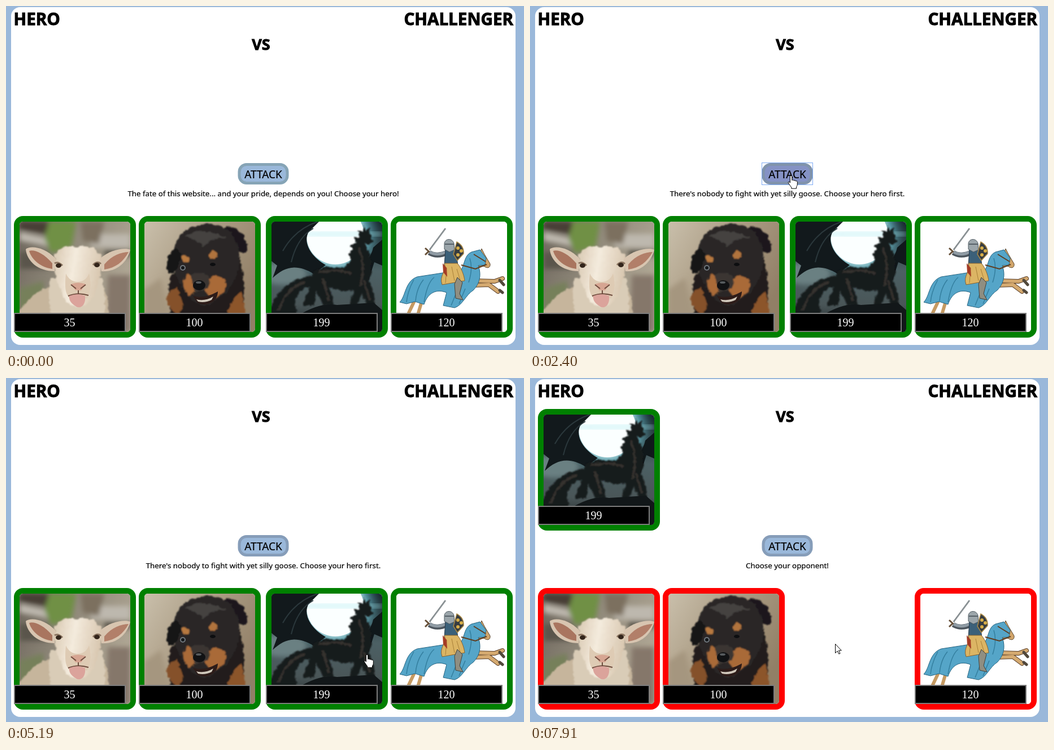
An HTML page for the animation above (7.99 s loop, 917 px wide and 611 px high).

```html
<!DOCTYPE html>
<html lang="en">
<head>
<meta charset="utf-8">
<title>Hero vs Challenger</title>
<style>
  html, body { margin: 0; width: 100%; height: 100%; overflow: hidden; background: #9ab8da; }
  svg.stage { display: block; width: 100vw; height: 100vh; }
  text { font-family: "Noto Sans", "Open Sans", sans-serif; fill: #000; stroke: #000; stroke-width: .2px; }
  .head { font-size: 29.6px; font-weight: 700; stroke-width: 1px; }
  .mid { text-anchor: middle; }
  .hp { font: 20px "Liberation Serif", "Noto Serif", serif; fill: #fff; stroke: none; }
  .frame { fill: #fff; stroke: green; stroke-width: 10; }
  .enemy .frame { stroke: red; }
  .btn { fill: #9ab8da; stroke: #86a4b6; stroke-width: 5; }
  .used .btn { stroke: #869db9; }
  .hover .btn { fill: #8592c5; stroke: #8093ac; }
  .ring { fill: none; stroke: #7eabf5; visibility: hidden; }
  .focus .ring { visibility: visible; }
  .arrow, .hand { fill: #fff; stroke: #000; stroke-linejoin: round; }
  .beam { fill: none; stroke: #000; }
</style>
</head>
<body>
<svg class="stage" viewBox="0 0 917 611">
  <defs>
    <clipPath id="inner"><rect width="196" height="196" rx="6"/></clipPath>
    <filter id="soft" x="-30%" y="-30%" width="160%" height="160%"><feGaussianBlur stdDeviation="4"/></filter>
    <filter id="fur" x="-10%" y="-10%" width="120%" height="120%">
      <feTurbulence type="fractalNoise" baseFrequency=".14" numOctaves="2" seed="4" result="n"/>
      <feDisplacementMap in="SourceGraphic" in2="n" scale="7" xChannelSelector="R" yChannelSelector="G"/>
      <feGaussianBlur stdDeviation=".8"/>
    </filter>
    <linearGradient id="yard" x2="1" y2=".4">
      <stop offset="0" stop-color="#6d665c"/><stop offset=".5" stop-color="#918a7b"/><stop offset="1" stop-color="#aea593"/>
    </linearGradient>
    <linearGradient id="floor" x2="1" y2=".6">
      <stop offset="0" stop-color="#c9bfab"/><stop offset=".5" stop-color="#ab9c84"/><stop offset="1" stop-color="#917f66"/>
    </linearGradient>
    <linearGradient id="wool" x2="1" y2=".2">
      <stop offset="0" stop-color="#d8c8b1"/><stop offset=".45" stop-color="#f4ebdd"/><stop offset="1" stop-color="#d9c8b1"/>
    </linearGradient>
    <linearGradient id="night" x2="0" y2="1">
      <stop offset="0" stop-color="#15242a"/><stop offset=".45" stop-color="#4c6064"/><stop offset=".75" stop-color="#4a5658"/><stop offset="1" stop-color="#202628"/>
    </linearGradient>
    <radialGradient id="glow">
      <stop offset=".5" stop-color="#e4ffff"/><stop offset=".68" stop-color="#6bbccb" stop-opacity=".7"/><stop offset="1" stop-color="#305860" stop-opacity="0"/>
    </radialGradient>

    <g id="sheep">
      <rect width="196" height="196" fill="url(#yard)"/>
      <g filter="url(#soft)">
        <path d="M0 0H60L48 22 0 14z" fill="#463d34"/>
        <path d="M0 18 52 30V44L0 34zM120 22H196V46H128z" fill="#bdb8ae"/>
        <path d="M0 54H50V84H0zM150 50H196V62H150z" fill="#5a554b"/>
        <path d="M52 0H100L92 44 56 56 44 30z" fill="#6f9044"/>
        <path d="M108 0H150L140 40 112 34z" fill="#7c705e"/>
        <path d="M0 118 42 106V150L0 160z" fill="#76805a"/>
        <path d="M156 95H196V196H152z" fill="#85776a"/>
      </g>
      <g filter="url(#fur)">
        <path d="M-4 162C14 140 32 120 56 114L145 112C160 130 158 160 156 200H-4z" fill="#c6b59c"/>
        <path d="M54 100C48 135 55 170 70 200H146C153 165 153 130 145 100z" fill="#d9ccb7"/>
        <path d="M62 64C65 45 85 42 102 45 122 40 143 50 146 66 147 90 138 116 130 134 122 156 84 156 78 134 70 116 58 92 62 64z" fill="url(#wool)"/>
      </g>
      <path d="M64 66C44 44 18 42 11 49 13 70 32 88 62 88z" fill="#d8c5b0"/>
      <path d="M58 74C42 55 25 49 17 52 22 69 38 81 58 84z" fill="#a9755f"/>
      <path d="M142 66C162 48 188 46 196 50 190 74 170 90 145 88z" fill="#d8c5b0"/>
      <path d="M150 76C163 60 180 54 193 54 183 72 170 82 150 85z" fill="#b27f69"/>
      <path d="M82 92C80 115 80 127 89 137L104 127 119 137C128 122 126 105 123 92 116 112 90 112 82 92z" fill="#decbb4"/>
      <path d="M62 74Q68 70 76 78M130 77Q138 69 144 75" fill="none" stroke="#8a7460" stroke-width="3"/>
      <ellipse cx="69" cy="78" rx="5" ry="4" fill="#33251b"/><ellipse cx="137" cy="77" rx="5" ry="4" fill="#33251b"/>
      <path d="M91 111Q104 106 117 111L109 122H99z" fill="#d6a592"/>
      <path d="M91 112 100 119M117 112 108 119M104 122V129M86 132Q104 125 122 131" fill="none" stroke="#6e4c3e" stroke-width="2"/>
      <path d="M88 132Q103 126 116 132C118 150 106 156 99 150 91 145 87 139 88 132z" fill="#dba39b"/>
    </g>

    <g id="puppy">
      <rect width="196" height="196" fill="url(#floor)"/>
      <path d="M0 120 30 100 50 196H0z" fill="#a5967f" filter="url(#soft)"/>
      <g filter="url(#fur)">
        <path d="M48 95C38 120 40 165 62 200H168C178 160 180 110 168 60L120 40z" fill="#221e1c"/>
        <path d="M46 122C34 140 42 156 60 166L70 148 58 118z" fill="#85512b"/>
        <path d="M146 160Q162 128 172 124L180 164 160 178z" fill="#8c552c"/>
        <path d="M140 12C162 0 184 28 182 54 168 60 154 46 140 12z" fill="#1a191a"/>
        <path d="M52 52C56 14 92 3 120 5 153 8 170 36 168 70 166 106 140 140 106 150 76 146 44 88 52 52z" fill="#2a2828"/>
        <path d="M72 26Q105 6 146 30 125 24 104 44 86 28 72 26z" fill="#454240"/>
        <path d="M57 46C36 58 36 84 44 92 58 94 62 72 66 59z" fill="#151414"/>
        <path d="M77 92C66 105 66 122 80 131L94 122 90 103zM118 98C130 92 148 100 144 118 138 130 128 136 116 136L106 121z" fill="#a96a38"/>
        <path d="M82 96Q97 83 115 98L114 118 90 126z" fill="#3a3633"/>
        <ellipse cx="73" cy="66" rx="8" ry="6" transform="rotate(28 73 66)" fill="#b77940"/>
        <ellipse cx="122" cy="59" rx="7" ry="8" transform="rotate(25 122 59)" fill="#b0733d"/>
      </g>
      <circle cx="68" cy="82" r="5" fill="#6f777d"/><circle cx="68" cy="82" r="3" fill="#15181b"/>
      <ellipse cx="121" cy="76" rx="5" ry="3" fill="#0d0e10"/>
      <ellipse cx="97" cy="113" rx="11" ry="9" fill="#111214"/><ellipse cx="96" cy="108" rx="5" ry="2" fill="#575b5e"/>
      <path d="M86 132Q106 138 130 124C130 144 108 152 94 144z" fill="#2d1c19"/>
      <path d="M92 138Q107 142 122 133L119 139Q107 145 95 142z" fill="#cfc7ba"/>
    </g>

    <g id="dragon">
      <rect width="196" height="196" fill="url(#night)"/>
      <ellipse cx="20" cy="92" rx="42" ry="20" fill="#6b8082" filter="url(#soft)"/>
      <circle cx="113" cy="25" r="86" fill="url(#glow)"/>
      <circle cx="113" cy="25" r="51" fill="#fbffff"/>
      <path d="M0 22 80 19H196V25H65z" fill="#a2e7ee" opacity=".55" filter="url(#soft)"/>
      <path d="M0 0H84L66 18C56 34 66 60 96 77L75 93C45 74 23 80 2 100L10 78 0 70z" fill="#12191c"/>
      <path d="M82 0Q42 13 20 52M74 12Q45 29 35 72" fill="none" stroke="#2b383c" stroke-width="2"/>
      <path d="M156 96C160 72 176 67 180 46L196 32V78L182 72 172 104z" fill="#10181b"/>
      <g filter="url(#fur)">
        <path d="M-4 160C8 122 35 100 72 97 72 86 86 80 106 81L130 82C140 74 140 64 136 58L144 50 140 42 150 38 146 28 156 27 152 16 162 17 163 6 168 15 174 10 172 22 182 36 170 42 164 38C178 62 180 86 172 106L179 121 183 147 169 150 160 126 152 149 139 150 145 121C124 127 112 119 102 116L112 149H92L80 123 75 149H55L68 116C46 120 34 140 48 168H-4z" fill="#191b1c"/>
        <path d="M84 89Q124 84 142 92M60 107Q28 116 12 158M154 46Q168 76 157 115M91 102 102 140M164 104 174 140" fill="none" stroke="#36322f" stroke-width="4"/>
      </g>
      <path d="M45 168Q86 142 116 148L181 144 196 157V196H0V166z" fill="#121719"/>
    </g>

    <g id="knight">
      <rect width="196" height="196" fill="#fff"/>
      <g fill="none" stroke-linecap="round" stroke-linejoin="round">
        <path d="M136 113 164 112 180 124M137 105 174 106 188 101" stroke="#553923" stroke-width="8"/>
        <path d="M136 113 164 112 180 124M137 105 174 106 188 101" stroke="#d5aa70" stroke-width="6"/>
        <path d="M183 122 188 126M183 104 190 112" stroke="#51483b" stroke-width="5"/>
        <path d="M31 143 22 162M44 145 39 162" stroke="#c59a62" stroke-width="6"/>
      </g>
      <path d="M147 60 151 48 156 58 166 75C167 82 161 84 155 79L142 80z" fill="#d2a66b" stroke="#59452e"/>
      <path d="M114 87C122 74 120 60 133 54L148 50 159 65 157 77 145 78C151 94 148 110 136 122 123 130 117 149 103 153L83 149 89 126C71 119 56 126 49 147L33 142 18 146 6 143C17 132 15 106 37 98L82 91z" fill="#55a5c8" stroke="#276480"/>
      <path d="M31 103Q20 123 18 143M48 103Q36 118 34 141M67 99Q55 108 49 143M105 129 97 149M122 119 111 146M130 65Q136 83 128 108" fill="none" stroke="#337e9e" stroke-width="1.5"/>
      <path d="M115 77 140 84 160 76M137 58 158 71" fill="none" stroke="#5f3e21" stroke-width="2"/>
      <path d="M59 50 87 12" stroke="#5a6266" stroke-width="2.4"/><path d="M60 49 87 12" stroke="#d1d8da" stroke-width=".8"/>
      <path d="M51 47 63 58M57 53 51 59" stroke="#67513a" stroke-width="3"/>
      <path d="M58 55Q73 64 91 54" fill="none" stroke="#4d565e" stroke-width="9"/>
      <path d="M59 54Q73 62 89 53" fill="none" stroke="#8f9ba4" stroke-width="5"/>
      <path d="M87 49H105L109 78H85z" fill="#3b6079" stroke="#25394a"/>
      <path d="M85 74H108C115 82 120 95 121 105L81 112C75 95 90 88 85 74z" fill="#dcb564" stroke="#866230"/>
      <path d="M89 82 87 109M98 80 103 105M107 84 113 104" stroke="#a98039"/>
      <path d="M82 74 89 82 90 98 83 90z" fill="#a43c25"/>
      <path d="M108 99 117 108 112 128 118 139 105 136 103 111z" fill="#8f8e81" stroke="#42413b"/>
      <path d="M85 49V39C86 29 100 29 102 39L103 50 94 54z" fill="#9ba5aa" stroke="#4f5a61"/>
      <path d="M86 40H102" stroke="#576168" stroke-width="2"/>
      <path d="M107 36Q120 43 119 57L108 69 101 58z" fill="#363c41" stroke="#aa8844" stroke-width="1.5"/>
      <g fill="#d7ae48"><circle cx="109" cy="47" r="3"/><circle cx="115" cy="52" r="3"/><circle cx="109" cy="59" r="3"/></g>
    </g>
  </defs>

  <rect width="917" height="611" fill="#9ab8da"/>
  <rect x="9" y="2" width="893" height="600" rx="16" fill="#fff"/>
  <text class="head" x="13.5" y="34">HERO</text>
  <text class="head" x="898" y="34" text-anchor="end">CHALLENGER</text>
  <text class="head mid" x="451.5" y="78" style="font-size:27px">VS</text>

  <g id="attack">
    <rect class="btn" x="413" y="281.5" width="85" height="33" rx="13"/>
    <rect class="ring" x="410.5" y="278.5" width="90" height="39"/>
    <text class="mid" x="455.5" y="306" font-size="19">ATTACK</text>
  </g>
  <text id="msg" class="mid" x="455.5" y="338" font-size="13.3"></text>
  <g id="cards"></g>
  <g id="cursor">
    <path class="arrow" d="M.5.5V16.5L4.2 13 6.8 18.2 9 17.2 6.5 12H11.3z"/>
    <path class="hand" d="M-1.6 13V2a1.7 1.7 0 0 1 3.4 0V8.5c1-1 3-.8 3.3.7 1-.9 2.9-.6 3.2.8 1.2-.7 3 .1 3 1.7V16c0 2-1.4 3.2-1.8 5v2.2H.8V21.2C-1.5 18-3.2 15.7-4.6 13.2c-.8-1.8 1-2.8 2-1.6z"/>
    <path class="beam" d="M.5-7V7M-2 7.5H0M1 7.5H3M-2-7.5H0M1-7.5H3"/>
  </g>
</svg>
<script>
const LOOP = 7990, PRESS = 2250, REPLY = 2400, BLUR = 5190, PICK = 5420;
const $ = id => document.getElementById(id);

const cards = [
  { id: "sheep", hp: 35, x: 14 },
  { id: "puppy", hp: 100, x: 235 },
  { id: "dragon", hp: 199, x: 460 },
  { id: "knight", hp: 120, x: 681 }
];
$("cards").innerHTML = cards.map(c => `<g>
  <rect class="frame" x="5" y="5" width="206" height="206" rx="11"/>
  <g transform="translate(10 10)" clip-path="url(#inner)"><use href="#${c.id}"/></g>
  <rect x="1" y="173" width="196" height="32" stroke="#7d7d7d" stroke-width="2"/>
  <text class="hp mid" x="98.5" y="196">${c.hp}</text></g>`).join("");
cards.forEach((c, i) => c.el = $("cards").children[i]);

// Pointer moves: first step, last step, step count, end point
const moves = [
  [610, 1390, 11, 494, 348],
  [1470, 1620, 3, 474, 324],
  [1697, 1930, 4, 462, 301],
  [3260, 3870, 9, 537, 431],
  [3950, 4030, 2, 558, 449],
  [4100, 4730, 9, 639, 490],
  [4880, 4880, 1, 639, 491],
  [5420, 5420, 1, 640, 491],
  [6890, 7510, 9, 500, 454],
  [7590, 7590, 1, 493, 457],
  [7750, 7910, 3, 540, 472]
];

function pointer(t) {
  let x = 791, y = 623;
  for (const [from, to, n, ex, ey] of moves) {
    if (t < from) break;
    const gap = (to - from) / (n - 1);
    const k = t >= to ? 1 : (Math.floor((t - from) / gap + 0.01) + 1) / n;
    x += (ex - x) * k;
    y += (ey - y) * k;
  }
  return [Math.round(x), Math.round(y)];
}

const within = (x, y, l, t, r, b) => x >= l && x <= r && y >= t && y <= b;

function render(t) {
  const picked = t >= PICK;
  const [x, y] = pointer(t);
  const hover = t >= 610 && within(x, y, 410, 279, 501, 317);

  $("msg").textContent = picked ? "Choose your opponent!"
    : t >= REPLY ? "There's nobody to fight with yet silly goose. Choose your hero first."
    : "The fate of this website... and your pride, depends on you! Choose your hero!";

  const attack = $("attack").classList;
  attack.toggle("hover", hover);
  attack.toggle("used", t >= PRESS);
  attack.toggle("focus", t >= PRESS && t < BLUR);

  let onCard = false;
  for (const c of cards) {
    const hero = picked && c.id === "dragon";
    const cx = hero ? 14 : c.x, cy = hero ? 55 : 373;
    c.el.setAttribute("transform", `translate(${cx} ${cy})`);
    c.el.classList.toggle("enemy", picked && !hero);
    onCard = onCard || within(x, y, cx, cy, cx + 216, cy + 216);
  }

  const kind = hover || onCard ? "hand" : within(x, y, 215, 322, 696, 344) ? "beam" : "arrow";
  $("cursor").setAttribute("transform", `translate(${x} ${y})`);
  for (const p of $("cursor").children) {
    p.style.display = t >= 610 && p.classList.contains(kind) ? "" : "none";
  }
}

const start = performance.now();
function tick() {
  render((performance.now() - start) % LOOP);
  requestAnimationFrame(tick);
}
tick();
</script>
</body>
</html>
```
